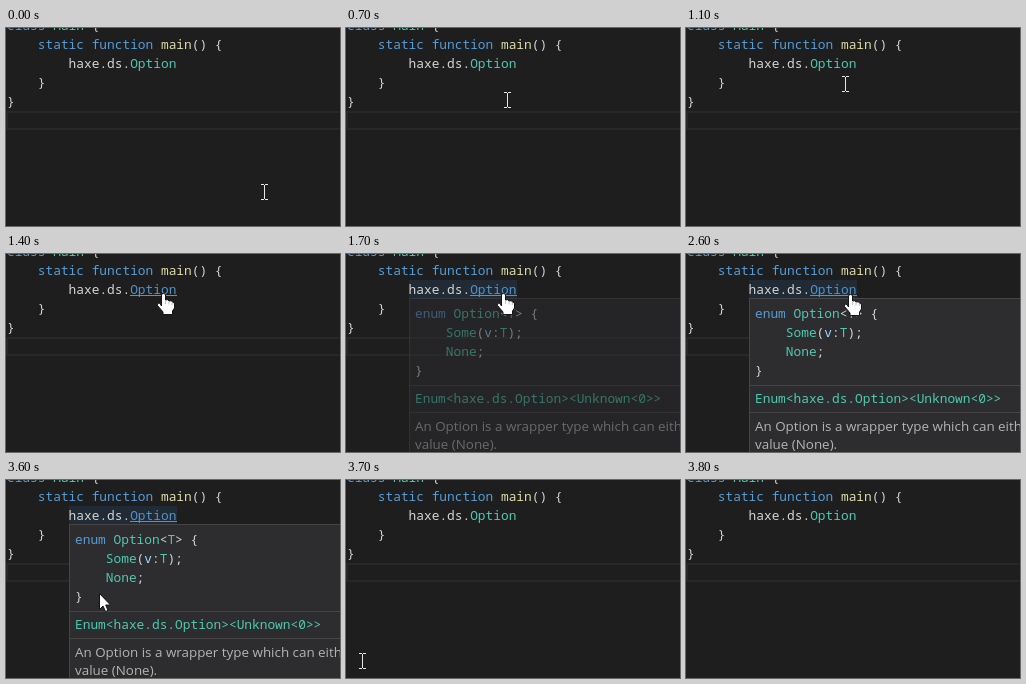
Animation, 334 px wide and 198 px high, one loop 4200 ms. Source, as an HTML page:

```html
<!DOCTYPE html>
<html lang="en">
<head>
<meta charset="utf-8">
<style>
  html, body { margin: 0; width: 100%; height: 100%; overflow: hidden; background: #1e1e1e; }
  svg { display: block; }
  text { white-space: pre; fill: #d4d4d4; font: 12.83px "Noto Sans Mono", monospace; }
  .keyword { fill: #569cd6; }
  .type { fill: #4ec9b0; }
  .call { fill: #dcdcaa; }
  .param { fill: #9cdcfe; }
  .link { fill: #4e94ce; }
  .prose { fill: #b4b4b4; font: 13.4px "Open Sans", sans-serif; }
</style>
</head>
<body>
<svg width="334" height="198" viewBox="0 0 334 198">
  <rect x="1" y="84" width="340" height="17" fill="none" stroke="#282828" stroke-width="2"/>
  <rect id="wordHighlight" x="63" y="26" width="108" height="19" fill="#264f78" opacity=".25"/>

  <text x="1" y="2"><tspan class="keyword">class</tspan> <tspan class="type">Main</tspan> {</text>
  <text x="31.8" y="21"><tspan class="keyword">static function</tspan> <tspan class="call">main</tspan>() {</text>
  <text x="62.6" y="40">haxe.ds.<tspan id="typeName">Option</tspan></text>
  <text x="31.8" y="59">}</text>
  <text x="1" y="78">}</text>
  <rect id="underline" x="124" y="41" width="47" height="1" fill="#4e94ce"/>

  <g id="hover">
    <rect x="63.5" y="44.5" width="300" height="180" fill="#2d2d30" stroke="#454545"/>
    <path d="M64 131.5H334M64 158.5H334" stroke="#454545"/>
    <text x="69" y="64"><tspan class="keyword">enum</tspan> <tspan class="type">Option</tspan>&lt;<tspan class="type">T</tspan>&gt; {</text>
    <text x="99.8" y="83"><tspan class="type">Some</tspan>(<tspan class="param">v</tspan>:<tspan class="type">T</tspan>);</text>
    <text x="99.8" y="102"><tspan class="type">None</tspan>;</text>
    <text x="69" y="121">}</text>
    <text x="69" y="149" class="type">Enum&lt;haxe.ds.Option&gt;&lt;Unknown&lt;0&gt;&gt;</text>
    <text x="69" y="177" class="prose">An Option is a wrapper type which can either have</text>
    <text x="69" y="195" class="prose">value (None).</text>
  </g>

  <!-- Each pointer has its hotspot at the local origin. -->
  <path id="beam" d="M-3 -7.5H0M1 -7.5H4M.5 -7V7M-3 7.5H0M1 7.5H4" stroke="#e6e6e6" fill="none"/>
  <g id="hand" stroke="#151515" stroke-linejoin="round">
    <path fill="#fff" d="M-1.5 13V2Q-1.5 .5 .5 .5T2.5 2V7Q5 6 6 8Q8.500 7 9.500 9Q11.500 9 11.500 11V15L9.500 18V21.500H0V19L-5.500 12.500Q-6 10 -4 10Q-3 10 -1.500 13Z"/>
    <path fill="none" stroke="#aaa" stroke-width=".7" d="M2.500 8V11M6 8.500V11.500M9.200 9.500V12"/>
  </g>
  <path id="arrow" fill="#fff" stroke="#111" d="M.5 .5V16.500L4 13L6.500 18.500L9 17.500L6.700 12H11.500Z"/>
</svg>
<script>
const LOOP = 4200, STEP = 100;
const pointers = ["beam", "hand", "arrow"];
const el = Object.fromEntries(
  [...pointers, "hover", "wordHighlight", "underline", "typeName"]
    .map(id => [id, document.getElementById(id)]));

// Pointer path: time, x, y; the pointer rests between equal positions.
const path = [
  [0, 258, 164], [600, 161, 73], [700, 161, 72], [800, 161, 72],
  [1400, 157, 39], [2400, 157, 39], [2600, 164, 40], [3500, 164, 40],
  [3600, 93, 113], [3700, 16, 181]
];
const clamp = v => Math.max(0, Math.min(1, v));
const ease = p => p * p * (3 - 2 * p);

function pointerAt(t) {
  const next = path.findIndex(point => point[0] > t);
  if (next < 0) return path.at(-1).slice(1);
  const [t0, x0, y0] = path[next - 1], [t1, x1, y1] = path[next];
  const p = ease((t - t0) / (t1 - t0));
  return [x0 + (x1 - x0) * p, y0 + (y1 - y0) * p].map(Math.round);
}

function pointerKind(t) {
  if (t >= 3800) return "none";
  if (t === 3600) return "arrow";
  return t >= 1300 && t < 3600 ? "hand" : "beam";
}

function draw(now) {
  const t = Math.floor(now % LOOP / STEP) * STEP;
  const linked = t >= 1300 && t < 3700;
  const hoverOpacity = t < 3700 ? clamp((t - 1600) / 200) : 0;
  el.hover.setAttribute("opacity", hoverOpacity);
  el.wordHighlight.setAttribute("opacity", hoverOpacity ? .25 : 0);
  el.underline.setAttribute("opacity", linked ? 1 : 0);
  el.typeName.setAttribute("class", linked ? "link" : "type");

  const kind = pointerKind(t), [x, y] = pointerAt(t);
  for (const id of pointers) {
    el[id].setAttribute("transform", `translate(${x} ${y})`);
    el[id].setAttribute("visibility", id === kind ? "visible" : "hidden");
  }
}

const start = performance.now();
function tick() {
  draw(performance.now() - start);
  requestAnimationFrame(tick);
}
tick();
</script>
</body>
</html>
```
